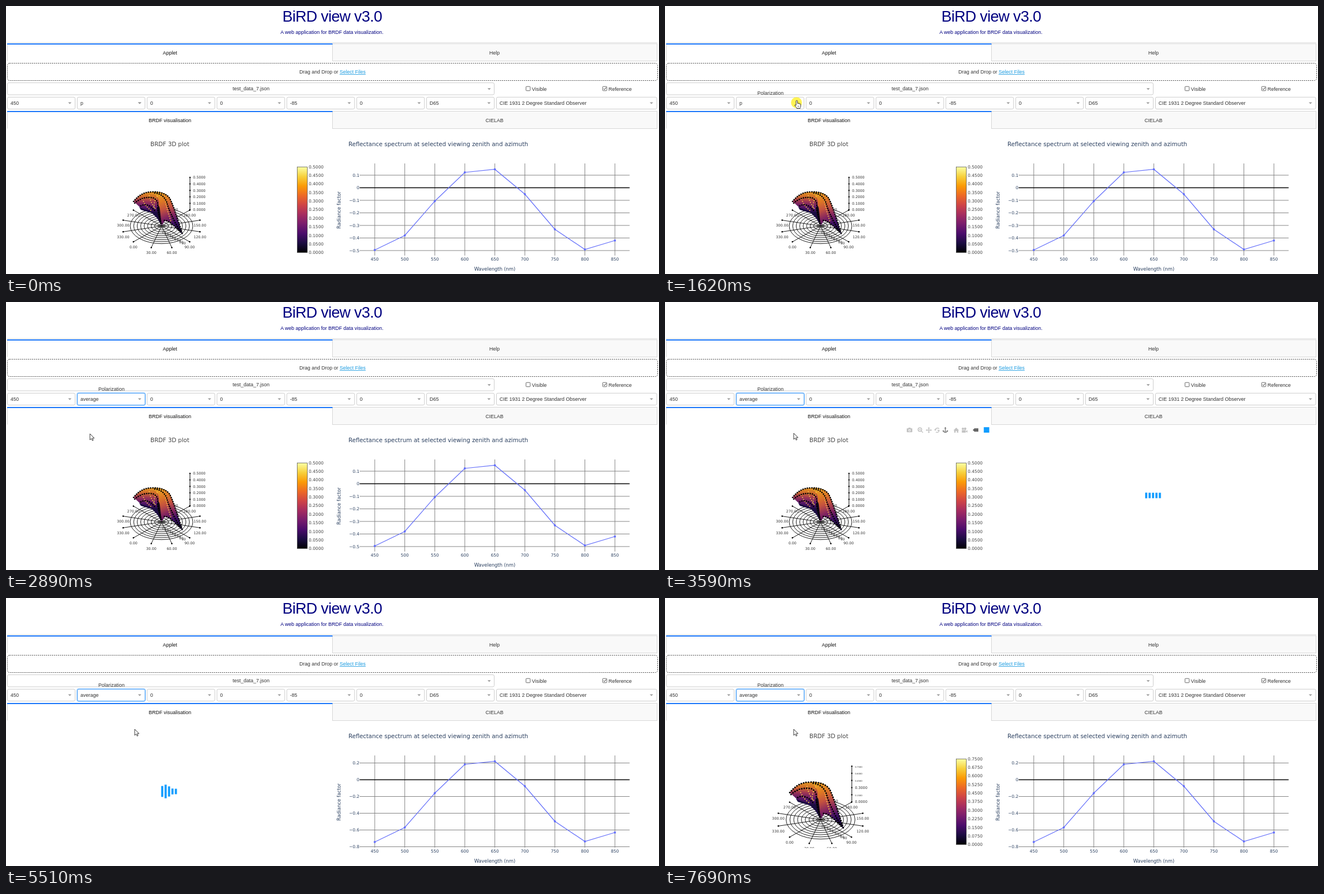
Recreate the animation shown at these times as an HTML page. Size 1167 by 480 pixels, loop 8 s.

```html
<!DOCTYPE html>
<html lang="en">
<head>
<meta charset="utf-8">
<title>BRDF viewer</title>
<style>
  html, body { margin: 0; width: 100%; height: 100%; overflow: hidden; background: #fff; }
  svg { display: block; width: 100vw; height: 100vh; }
  text { font: 9px "Liberation Sans", Arial, sans-serif; fill: #333; }
  .plot { font-family: "DejaVu Sans", Verdana, sans-serif; }
</style>
</head>
<body>
<svg id="stage" viewBox="0 0 1167 480" preserveAspectRatio="none"></svg>
<script>
const LOOP = 8000;
const stage = document.getElementById('stage');
const $ = id => document.getElementById(id);
const range = n => [...Array(n).keys()];
const each = (n, fn) => range(n).map(fn).join('');

// Drawing helpers
const text = (x, y, s, o = '') => `<text x="${x}" y="${y}" ${o}>${s}</text>`;
const mid = (x, y, s, o = '') => text(x, y, s, 'text-anchor="middle" ' + o);
const plotText = (x, y, s, size, fill, anchor = 'start') =>
  text(x, y, s, `class="plot" text-anchor="${anchor}" style="font-size:${size}px;fill:${fill}"`);
const rect = (x, y, w, h, fill, o = '') =>
  `<rect x="${x}" y="${y}" width="${w}" height="${h}" fill="${fill}" ${o}/>`;
const line = (x1, y1, x2, y2, color, w = 1) =>
  `<path d="M${x1} ${y1}L${x2} ${y2}" stroke="${color}" stroke-width="${w}" fill="none"/>`;
const dot = (x, y, r, fill) => `<circle cx="${x}" cy="${y}" r="${r}" fill="${fill}"/>`;
const group = (id, body, o = '') => `<g id="${id}" ${o}>${body}</g>`;

function tabs(y, left, right) {
  return rect(583.5, y - 1, 580, 31, '#f9f9f9', 'stroke="#d6d6d6"') +
    line(2.5, y, 2.5, y + 30, '#d6d6d6') +
    rect(2, y - 1.5, 581.5, 2, '#1975fa') +
    mid(293, y + 18.8, left, 'style="fill:#111"') + mid(873, y + 18.6, right);
}

const caret = (x, y) => `<path d="M${x - 3} ${y - 1.3}h6l-3 3z" fill="#999"/>`;

function dropdown(x, y, right, label) {
  return rect(x, y, right - x, 21.3, '#fff', 'rx="2.5" stroke="#ccc"') +
    text(x + 5.5, y + 13.4, label) + caret(right - 9.5, y + 10.5);
}

function checkbox(x, label, on) {
  return rect(x, 144.2, 7.5, 7.5, '#fff', 'rx="1" stroke="#555" stroke-width=".9"') +
    (on ? `<path d="M${x + 1.5} 148l1.8 1.9 3-4.2" fill="none" stroke="#333"/>` : '') +
    text(x + 10.5, 151.5, label);
}

function page() {
  const values = ['450', '', '0', '0', '-85', '0', 'D65'];
  return text(494, 28.3, 'BiRD view v3.0', 'style="font-size:27.5px;letter-spacing:-.61px;fill:navy"') +
    mid(582.5, 49.7, 'A web application for BRDF data visualization.', 'style="fill:navy"') +
    line(2, 65.5, 1164, 65.5, '#ddd') +
    tabs(68.5, 'Applet', 'Help') +
    rect(2.5, 102.5, 1162, 31, '#fff', 'rx="4" stroke="#444" stroke-dasharray="2 1.6"') +
    mid(583.5, 121.2, 'Drag and Drop or <tspan fill="#1a9be0" text-decoration="underline">Select Files</tspan>') +
    rect(2.5, 137.5, 870, 21.5, '#fff', 'rx="2.5" stroke="#ccc"') +
    mid(438, 151.3, 'test_data_7.json') + caret(863.5, 148.6) +
    checkbox(929.3, 'Visible', false) + checkbox(1066.3, 'Reference', true) +
    values.map((v, i) => dropdown(2.5 + i * 124.85, 163.3, 123.5 + i * 124.85, v)).join('') +
    dropdown(876.5, 163.3, 1163, 'CIE 1931 2 Degree Standard Observer') +
    tabs(189.5, 'BRDF visualisation', 'CIELAB');
}

// Reflectance chart: both data sets share one curve, only the scale differs
const curve = [437, 411, 349.5, 298, 292.5, 337, 400, 436, 420];
const chartX = i => 659 + i * 53.65;

function chartGrid(first, count, step, gap) {
  return each(count, i => {
    const k = first - i, y = 325.5 - k * gap;
    const label = (k * step).toFixed(1).replace('-', '−');
    return (k ? line(632, y, 1114.5, y, '#777', .9) : '') +
      plotText(631.5, y + 2.7, k ? label : '0', 7.5, '#2a3f5f', 'end');
  });
}

function chart() {
  const ink = '#2a3f5f';
  return plotText(612, 251.2, 'Reflectance spectrum at selected viewing zenith and azimuth', 10.4, ink) +
    each(9, i => line(chartX(i), 282, chartX(i), 447, '#777', .9) +
      plotText(chartX(i), 456.3, 450 + 50 * i, 7.5, ink, 'middle')) +
    group('gridP', chartGrid(1, 7, .1, 22.5)) + group('gridAvg', chartGrid(1, 6, .2, 30)) +
    line(632, 325.5, 1114.5, 325.5, '#000', 1.4) +
    `<polyline points="${curve.map((y, i) => chartX(i) + ',' + y).join(' ')}" fill="none" stroke="#636efa" stroke-width="1.25"/>` +
    curve.map((y, i) => dot(chartX(i), y, 1.9, '#636efa')).join('') +
    plotText(873.5, 473.5, 'Wavelength (nm)', 8.54, ink, 'middle') +
    `<g transform="translate(597.5 365.5) rotate(-90)">${plotText(0, 0, 'Radiance factor', 8.54, ink, 'middle')}</g>`;
}

const inferno = ['#000004', '#1b0c41', '#4a0c6b', '#781c6d', '#a52c60', '#cf4446', '#ed6925', '#fb9b06', '#f7d13d', '#fcffa4'];

function colorbar(max) {
  return rect(520.5, 288.2, 18, 153.5, 'url(#heat)', 'stroke="#444" stroke-width=".7"') +
    each(11, i => plotText(541, 444.2 - i * 15.35, (max * i / 10).toFixed(4), 7.6, '#444'));
}

// 3D plot: polar grid around (cx, cy), height axis and surface.
// Heights listed in far are labelled in smaller type.
function scene(cx, cy, s, max, far) {
  const at = (deg, r) => {
    const a = (135 - deg) * Math.PI / 180;
    return [cx + r * s * Math.cos(a), cy + r * s * .565 * Math.sin(a)];
  };
  const label = (x, y, v, size = 6.4, anchor = 'middle') => plotText(x, y + 2.3, v, size, '#333', anchor);
  const rings = each(9, i => {
    const r = 56 * (i + 1) / 9 * s;
    return `<ellipse cx="${cx}" cy="${cy}" rx="${r}" ry="${r * .565}" fill="none" stroke="#000" stroke-width=".9"/>`;
  });
  const spokes = each(12, i => {
    const [x, y] = at(i * 30, 71);
    return line(cx, cy, x, y, '#000', .9) + dot(x, y, 1.3, '#000') + label(x, y + 9, (i * 30).toFixed(2));
  });
  const radial = each(9, i => {
    const [x, y] = at(90, 56 * (i + 1) / 9);
    return label(x, y + 8.5, (i + 1) * 10, 6);
  });
  const ax = cx + 50.8 * s, base = cy - 29 * s, gap = 11.6 * s;
  const axis = line(ax, base, ax, base - 5 * gap, '#000') + each(6, i =>
    dot(ax, base - i * gap, 1.2, '#000') +
    label(ax + 5.5, base - i * gap, (max * i / 5).toFixed(4), far.includes(i) ? 3.8 : 6.4, 'start'));
  return rings + spokes + radial + axis +
    `<g transform="translate(${cx} ${cy}) scale(${s})">${surface()}</g>`;
}

function surface() {
  const fill = (d, c) => `<path d="${d}" fill="${c}"/>`;
  const beads = (d, color, w, gap) =>
    `<path d="${d}" fill="none" stroke="${color}" stroke-width="${w}" stroke-linecap="round" stroke-dasharray="0 ${gap}"/>`;
  const black = d => beads(d, '#000', 2.7, 4);
  const gold = d => beads(d, '#f6c544', 2, 4.2);
  return fill('M-40-34L-20-28-8-27-1-3-8-14-17-23-37-29Z', '#1b0c41') +
    fill('M-50-44C-42-54-32-61-18-61C-6-62 4-60 9-56C4-49 0-42-4-28C-9-23-16-25-22-27L-38-33Z', 'url(#sheet)') +
    fill('M-14-59C2-62 12-56 16-48C21-35 28-15 38 16C31 8 24 1 14-7L6-9 0-1C-3-8-5-20-6-32C-4-43-3-50-14-59Z', 'url(#lobe)') +
    fill('M-8-32C-7-38-4-38-3-30L0-3C-5-12-8-22-8-32Z', '#12081f') +
    gold('M-34-48C-30-38-26-33-18-27M-22-54C-20-45-16-36-10-30M-8-53C-13-46-14-38-13-30M6-50C8-38 11-24 17-8') +
    black('M-50-44C-42-54-32-61-18-61C-2-62 10-57 15-49C21-37 28-14 38 16') +
    black('M-48-41C-38-50-26-53-14-50C-8-47-6-41-7-34') +
    black('M-12-59C-2-58 5-53 9-43C13-30 19-14 34 11') +
    black('M-37-36C-28-41-19-36-12-27') +
    black('M-7-32C-5-22-3-12 0-2') +
    black('M5-10C14-10 23 1 36 13');
}

const gradient = (id, dir, stops) => `<linearGradient id="${id}" ${dir}>` +
  stops.map((c, i) => `<stop offset="${i / (stops.length - 1)}" stop-color="${c}"/>`).join('') + '</linearGradient>';

const defs = `<defs><clipPath id="sceneBox"><rect x="150" y="255" width="330" height="193"/></clipPath>` +
  gradient('heat', 'x1="0" y1="1" x2="0" y2="0"', inferno) +
  gradient('sheet', 'x1=".55" y1="0" x2=".45" y2="1"', ['#e39a22', '#d06c2a', '#9c3456', '#5a176a', '#240b4a']) +
  gradient('lobe', 'x1=".2" y1="0" x2=".5" y2="1"', ['#e8a126', '#df7a22', '#c4523f', '#85265f', '#3c0f62', '#1b0c41']) +
  '</defs>';

function modebar() {
  const g = '#c4c4c4', d = '#777';
  const stroke = (p, c) => `<path d="${p}" fill="none" stroke="${c}" stroke-width="1.4"/>`;
  const solid = (p, c) => `<path d="${p}" fill="${c}"/>`;
  return rect(432, 226.3, 10, 7, g, 'rx="1"') + rect(435, 225, 4, 2, g) + dot(437, 229.8, 2, '#fff') + dot(437, 229.8, 1.1, g) +
    `<circle cx="455.5" cy="228.5" r="3.2" fill="none" stroke="${g}" stroke-width="1.6"/>` +
    stroke('M458 231l3 3M454 228.5h3', g) +
    stroke('M467.5 229.5h8M471.5 225.5v8', g) +
    solid('M471.5 224l2 2.4h-4zM471.5 235l2-2.4h-4zM466 229.5l2.4-2v4zM477 229.5l-2.4-2v4z', g) +
    stroke('M483 229a4 3.5 0 0 1 7-2M490 230a4 3.5 0 0 1-6 3', g) + solid('M481 228h4l-2 3zM486 229h5l-2 2.5z', g) +
    stroke('M501 224.5v8M497.5 231.5q3.5 4 7 0', d) + solid('M501 224l2 2.6h-4zM496 230h3l-2 3zM506 230h-3l2 3z', d) +
    solid('M515.5 230l5-5 5 5h-1.3v4h-2.6v-3h-2.2v3h-2.6v-4z', g) +
    solid('M530.5 229.5h7v4.5h-7zM538 231l2.5-1.5v4.5l-2.5-1.5z', g) + dot(532.3, 227, 2, g) + dot(536.4, 227, 2.2, g) +
    solid('M550 229.3l3-3h7v6h-7z', '#666') +
    rect(569.7, 224.2, 9.8, 9.8, '#119dff');
}

function menu() {
  return rect(127.5, 184.6, 121, 65, '#fff', 'stroke="#ccc"') +
    rect(128, 185, 120, 21.4, '#e5f2ff', 'id="hover"') +
    ['p', 's', 'average'].map((s, i) =>
      text(133, 199 + i * 21.4, s, i ? '' : 'style="font-weight:bold"')).join('');
}

const bars = (id, x) => group(id, each(5, i => rect(x + i * 6.1, 334.3, 3.8, 24.4, '#119dff')));

const arrow = '<path d="M0 0V11L2.6 8.6 4.3 12.3 6 11.5 4.4 7.9H7.8Z" fill="#fff" stroke="#222" stroke-width=".9"/>';
const hand = '<path d="M-1.3 7.5V-.6Q0-2 1.3-.6V4Q2.4 3.2 3.4 4.4 4.6 3.7 5.4 4.9 6.8 4.4 7 5.8V9.5Q6.8 11 6 12V13H0V12Q-1.8 10-3.8 7.4-3.4 5.6-1.3 7.5Z" fill="#fff" stroke="#222" stroke-width=".9"/>' +
  '<path d="M2 8v3M3.8 8v3" stroke="#555" stroke-width=".6"/>';

stage.innerHTML = defs + rect(0, 0, 1167, 480, '#fff') + page() +
  group('focus', rect(127.5, 163.3, 121, 21.3, '#fff', 'rx="2.5" stroke="#b9dcff" stroke-width="3"') +
    rect(127.5, 163.3, 121, 21.3, '#fff', 'rx="2.5" stroke="#3b97f5"')) +
  text(133, 176.7, '', 'id="value"') + group('caret', caret(238.9, 173.8)) +
  group('tip', text(165, 159.2, 'Polarization')) +
  group('plotHead', plotText(258, 251.2, 'BRDF 3D plot', 10.4, '#444')) +
  group('barP', colorbar(.5)) + group('barAvg', colorbar(.75)) +
  `<g clip-path="url(#sceneBox)">${group('sceneP', scene(278, 394, 1, .5, []))}${group('sceneAvg', scene(278, 397, 1.1, .75, [1, 3, 4, 5]))}</g>` +
  group('chart', chart()) + group('modebar', modebar()) +
  bars('loadLeft', 277.3) + bars('loadRight', 858.1) +
  group('menu', menu()) +
  '<circle id="click" r="9.8" fill="#fff02a" opacity=".8"/>' +
  group('cursor', group('arrow', arrow) + group('hand', hand));

const show = (id, on) => $(id).style.display = on ? '' : 'none';
const clamp = (v, lo, hi) => Math.min(hi, Math.max(lo, v));
const smooth = s => s * s * (3 - 2 * s);

// Pointer path: start, end, then the point reached
const moves = [
  [510, 1300, 235, 171],
  [1330, 1470, 235.5, 170.5],
  [1920, 2450, 150, 236],
  [2890, 3160, 230, 235],
];

function pointer(t) {
  let x = 1150, y = 447;
  for (const [from, to, nx, ny] of moves) {
    const s = smooth(clamp((t - from) / (to - from), 0, 1));
    x += (nx - x) * s;
    y += (ny - y) * s;
  }
  return [x, y];
}

// Each bar stretches and shrinks in the first 40% of its cycle, one step after its neighbour
const CYCLE = 1140;
function stretch(id, t, start) {
  [...$(id).children].forEach((bar, i) => {
    const ms = t - start - i * CYCLE / 12;
    const p = ms < 0 ? 0 : ms % CYCLE / (CYCLE * .2);
    const h = 24.4 * (p < 2 ? .4 + .6 * smooth(p < 1 ? p : 2 - p) : .4);
    bar.setAttribute('y', 346.5 - h / 2);
    bar.setAttribute('height', h);
  });
}

function render(t) {
  const between = (a, b) => t >= a && t < b;
  const [x, y] = pointer(t);
  const open = between(1690, 2690);
  const before = t < 4050;

  show('focus', t >= 1690);
  $('value').textContent = t < 2690 ? 'p' : 'average';
  $('caret').setAttribute('transform', open ? 'rotate(180 238.9 173.9)' : '');
  show('tip', t >= 1110);
  show('menu', open);
  $('hover').setAttribute('y', 185 + 21.4 * clamp(Math.floor((y - 185) / 21.4), 0, 2));

  show('plotHead', before || t >= 7570);
  show('barP', before);
  show('sceneP', before);
  show('barAvg', t >= 7570);
  show('sceneAvg', t >= 7630);
  show('modebar', between(2920, 4050));
  $('modebar').style.opacity = clamp((t - 2920) / 240, 0, 1);

  show('chart', !between(3590, 4430));
  show('gridP', t < 4000);
  show('gridAvg', t >= 4000);
  show('loadRight', between(3590, 4430));
  show('loadLeft', between(4050, 7540));
  stretch('loadRight', t, 3570);
  stretch('loadLeft', t, 4055);

  const pointing = between(1110, 2720);
  show('cursor', t >= 510);
  show('arrow', !pointing);
  show('hand', pointing);
  $('cursor').setAttribute('transform', `translate(${x} ${y})`);
  show('click', between(1620, 1720) || between(2600, 2700));
  $('click').setAttribute('cx', x - .5);
  $('click').setAttribute('cy', y + 2.5);
}

const start = performance.now();
function tick() {
  render((performance.now() - start) % LOOP);
  requestAnimationFrame(tick);
}
tick();
</script>
</body>
</html>
```
